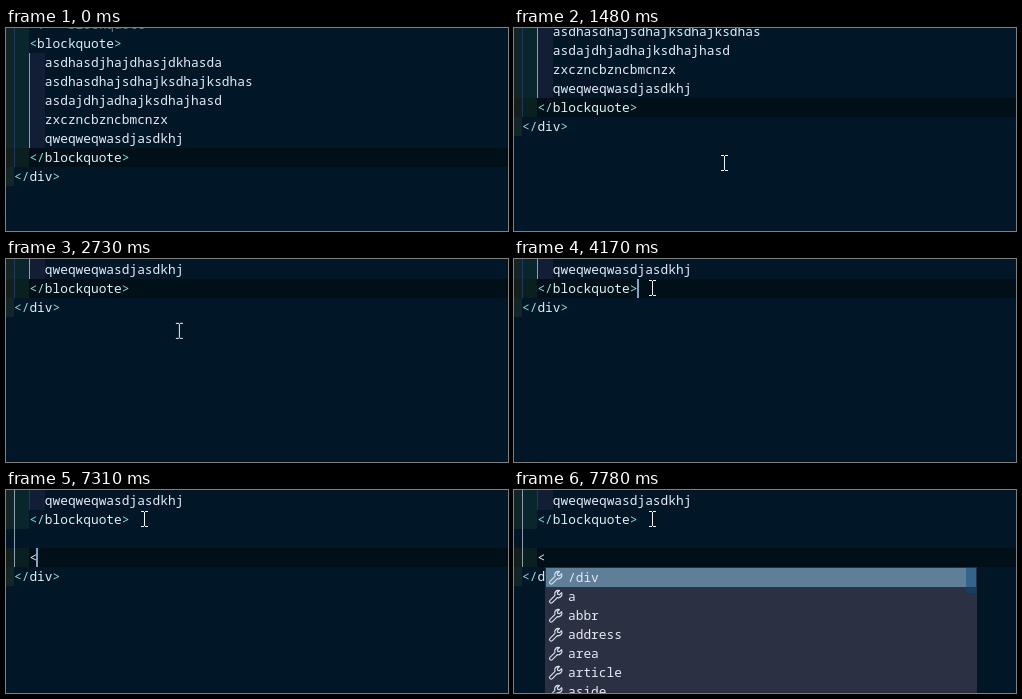
These frames come from a looping animation (502x203 px, 8000 ms). An HTML page:

```html
<!DOCTYPE html>
<html lang="en">
<head>
<meta charset="utf-8">
<title>Editor typing</title>
<style>
  html, body { margin: 0; width: 502px; height: 203px; overflow: hidden; background: #011627; }
  svg { display: block; }
  text { font: 12.83px "Noto Sans Mono", "DejaVu Sans Mono", monospace; fill: #e4ebf5; white-space: pre; }
  .punct { fill: #8fdfe0; }
  .tag { fill: #dcf1f2; }
  .comment { fill: #637777; }
  .icon { fill: none; stroke: #d6deeb; stroke-width: 1.2; stroke-linejoin: round; }
</style>
</head>
<body>
<svg id="stage" width="502" height="203" viewBox="0 0 502 203"></svg>
<script>
const LOOP = 8000, ROW = 19, TOP = -13, CHAR = 7.7;
const TINTS = ['rgba(255,255,64,.07)', 'rgba(127,255,127,.07)', 'rgba(255,127,255,.07)'];
const EDGES = [0, 8, 23, 39];
const DIM = '#1f385c', ACTIVE = '#8a9fb2';

const rowY = i => TOP + i * ROW;
const indentX = level => 8 + (level - 1) * 2 * CHAR;
const rect = (x, y, w, h, fill, id = '') =>
  `<rect ${id && `id="${id}"`} x="${x}" y="${y}" width="${w}" height="${h}" fill="${fill}"/>`;
const label = (x, y, s, cls = '') => `<text class="${cls}" x="${x}" y="${y}">${s}</text>`;
const span = (cls, s) => `<tspan class="${cls}">${s}</tspan>`;
const tag = (open, name) => span('punct', open) + span('tag', name) + span('punct', '&gt;');
const tints = (y, levels) => TINTS.slice(0, levels)
  .map((c, i) => rect(EDGES[i], y, EDGES[i + 1] - EDGES[i], ROW, c)).join('');
const line = (i, level, s, cls) =>
  tints(rowY(i), level) + label(indentX(level), rowY(i) + 14, s, cls);

const body = ['asdhasdjhajdhasjdkhasda', 'asdhasdhajsdhajksdhajksdhas',
  'asdajdhjadhajksdhajhasd', 'zxczncbzncbmcnzx', 'qweqweqwasdjasdkhj'];
const options = ['/div', 'a', 'abbr', 'address', 'area', 'article', 'aside'];

const wrench = 'M13.6 4.2l-2 2-1.8-.4-.4-1.8 2-2A3.6 3.6 0 0 0 7 6.8L2 11.8a1.6 1.6 0 0 0 2.3 2.3' +
  'L9.3 9.1A3.6 3.6 0 0 0 13.6 4.2z';
const option = (s, i) => {
  const y = 78 + i * ROW;
  return `<path class="icon" transform="translate(34 ${y + 1.5})" d="${wrench}"/>` + label(54, y + 14, s);
};

document.getElementById('stage').innerHTML = `
  <g id="code">
    <g id="current">${rect(0, rowY(7), 502, ROW, '#010f19')}</g>
    ${line(0, 2, '&lt;!-- blockquote --&gt;', 'comment')}
    ${line(1, 2, tag('&lt;', 'blockquote'))}
    ${body.map((s, i) => line(i + 2, 3, s)).join('')}
    ${line(7, 2, tag('&lt;/', 'blockquote'))}
    <g id="closing">${line(8, 1, tag('&lt;/', 'div'))}</g>
    <g id="fresh">${tints(rowY(8), 2)}</g>
    ${rect(8, rowY(0), 1, 8 * ROW, DIM, 'outer')}
    ${rect(23, rowY(2), 1, 5 * ROW, ACTIVE, 'inner')}
    <g id="typed">${label(indentX(2), rowY(9) + 14, '&lt;')}</g>
    ${rect(0, rowY(7), 2, ROW, '#80a4c2', 'caret')}
  </g>
  <g id="popup">
    ${rect(31, 77, 432, 130, '#2b2f40')}
    ${rect(32, 78, 430, 128, '#2c3043')}
    ${rect(32, 78, 430, ROW, '#5f7e97')}
    ${options.map(option).join('')}
    ${rect(452, 78, 10, 25, 'rgba(8,77,129,.5)')}
  </g>
  <path id="pointer" fill="#f2f4f6" d="M0 0h3v1h-3zM4 0h3v1h-3zM3 1h1v14h-1zM0 15h3v1h-3zM4 15h3v1h-3z"/>`;

// Each step is [ms, properties, easing]; without easing the value holds.
function play(id, steps) {
  const frames = steps.map(([ms, props, easing = 'steps(1, end)']) =>
    ({ ...props, easing, offset: ms / LOOP }));
  frames.push({ ...steps[steps.length - 1][1], offset: 1 });
  document.getElementById(id).animate(frames, { duration: LOOP, iterations: Infinity });
}
const at = (x, y, opacity = 1) => ({ transform: `translate(${x}px, ${y}px)`, opacity });
const show = opacity => ({ opacity });
const ENTER1 = 4850, ENTER2 = 5620, TYPE = 7310, LIST = 7380;

play('code', [[0, at(0, 0)], [1480, at(0, -50)], [2240, at(0, -100)]]);
play('current', [[0, at(0, 0)], [ENTER1, at(0, ROW)], [ENTER2, at(0, 2 * ROW)]]);
play('closing', [[0, at(0, 0)], [ENTER1, at(0, ROW)], [ENTER2, at(0, 2 * ROW)]]);
play('fresh', [[0, at(0, 0, 0)], [ENTER1, at(0, 0)], [ENTER2, at(0, ROW)]]);
play('typed', [[0, show(0)], [TYPE, show(1)]]);
play('popup', [[0, show(0)], [LIST, show(1)]]);

const guide = (rows, fill) => ({ height: rows * ROW + 'px', fill });
play('outer', [[0, guide(8, DIM)], [ENTER1, guide(9, DIM)], [4980, guide(9, ACTIVE)],
  [ENTER2, guide(10, ACTIVE)]]);
play('inner', [[0, { fill: ACTIVE }], [4980, { fill: DIM }]]);

const caret = (x, row, on) => at(x, row * ROW, on);
play('caret', [
  [0, caret(123, 0, 0)], [3110, caret(123, 0, 1)], [3640, caret(123, 0, 0)],
  [4170, caret(123, 0, 1)], [4650, caret(123, 0, 0)],
  [ENTER1, caret(23, 1, 1)], [5340, caret(23, 1, 0)],
  [ENTER2, caret(23, 2, 1)], [6100, caret(23, 2, 0)],
  [6580, caret(23, 2, 1)], [7110, caret(23, 2, 0)],
  [TYPE, caret(30, 2, 1)], [7780, caret(30, 2, 0)]
]);

play('pointer', [
  [0, at(410, 190, 0)],
  [450, at(410, 190), 'linear'], [520, at(392, 185), 'linear'],
  [600, at(355, 173), 'linear'], [690, at(272, 142), 'ease-out'],
  [840, at(207, 127)], [1650, at(207, 125)],
  [1850, at(206, 124), 'linear'], [1940, at(204, 121)],
  [2240, at(203, 119), 'linear'], [2300, at(200, 115)],
  [2460, at(198, 112), 'linear'], [2730, at(170, 64), 'ease-out'],
  [3180, at(135, 21)]
]);
</script>
</body>
</html>
```
